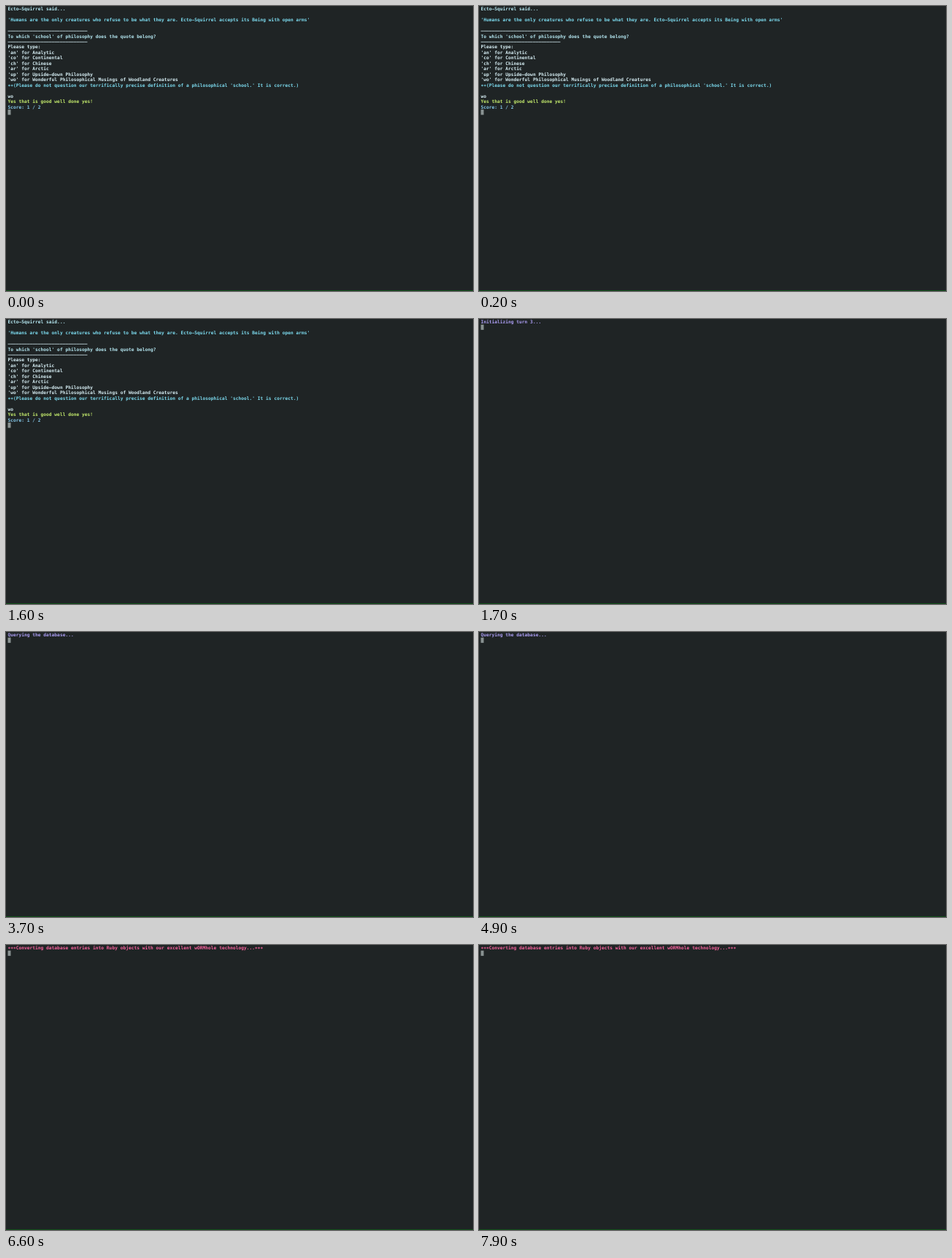
Animation of 640 by 391 pixels, one loop 8 s. Source, as an HTML page:

```html
<!DOCTYPE html>
<html lang="en">
<head>
<meta charset="utf-8">
<style>
  html, body { margin: 0; width: 100%; height: 100%; overflow: hidden; background: #1f2425; }
  svg { display: block; width: 100vw; height: 100vh; }
  text {
    font: bold 6.252px "DejaVu Sans Mono", monospace;
    white-space: pre;
    text-rendering: geometricPrecision;
  }
</style>
</head>
<body>
<svg viewBox="0 0 640 391" preserveAspectRatio="none">
  <rect width="640" height="391" fill="#1f2425"/>
  <rect y="390" width="640" height="1" fill="#12501a"/>
  <g id="lines"></g>
  <rect id="cursor" x="2.5" width="4" height="7.2" fill="#899292"/>
</svg>
<script>
const LOOP = 8000;
const LEFT = 2.4;
const ROW = 7.47;
const WHITE = '#d6eef4', PALE = '#b4e6f0', CYAN = '#7cdaee', GREEN = '#c3ea6c',
      BLUE = '#83c5e6', PURPLE = '#ab9df2', PINK = '#f7639d';
const rule = '-'.repeat(29);

const quiz = [
  [PALE, 'Ecto-Squirrel said...'],
  [],
  [CYAN, "'Humans are the only creatures who refuse to be what they are. Ecto-Squirrel accepts its Being with open arms'"],
  [],
  [WHITE, rule],
  [PALE, "To which 'school' of philosophy does the quote belong?"],
  [WHITE, rule],
  [WHITE, 'Please type:'],
  [WHITE, "'an' for Analytic"],
  [WHITE, "'co' for Continental"],
  [WHITE, "'ch' for Chinese"],
  [WHITE, "'ar' for Arctic"],
  [WHITE, "'up' for Upside-down Philosophy"],
  [WHITE, "'wo' for Wonderful Philosophical Musings of Woodland Creatures"],
  [CYAN, "**(Please do not question our terrifically precise definition of a philosophical 'school.' It is correct.)"],
  [],
  [WHITE, 'wo'],
  [GREEN, 'Yes that is good well done yes!'],
  [BLUE, 'Score: 1 / 2']
];

const screens = [
  { start: 0, lines: quiz },
  { start: 1700, lines: [[PURPLE, 'Initializing turn 3...']] },
  { start: 3700, lines: [[PURPLE, 'Querying the database...']] },
  { start: 5400, lines: [[PINK, '***Converting database entries into Ruby objects with our excellent wORMhole technology...***']] }
];

// Wide dashes and vertically centred asterisks, as in the terminal's typeface.
const terminalGlyphs = text => text.replaceAll('-', '\u2013').replaceAll('*', '\u2217');

const group = document.getElementById('lines');
const cursor = document.getElementById('cursor');
let shown = null;

function show(screen) {
  group.replaceChildren(...screen.lines.map(([color = 'none', content = ''], row) => {
    const line = document.createElementNS('http://www.w3.org/2000/svg', 'text');
    line.setAttribute('x', LEFT);
    line.setAttribute('y', 6.15 + row * ROW);
    line.setAttribute('fill', color);
    line.textContent = terminalGlyphs(content);
    return line;
  }));
  cursor.setAttribute('y', screen.lines.length * ROW + 0.2);
  shown = screen;
}

function render(now) {
  const time = now % LOOP;
  const screen = screens.findLast(s => time >= s.start);
  if (screen !== shown) show(screen);
}

const origin = performance.now();
function tick() {
  render(performance.now() - origin);
  requestAnimationFrame(tick);
}
tick();
</script>
</body>
</html>
```
